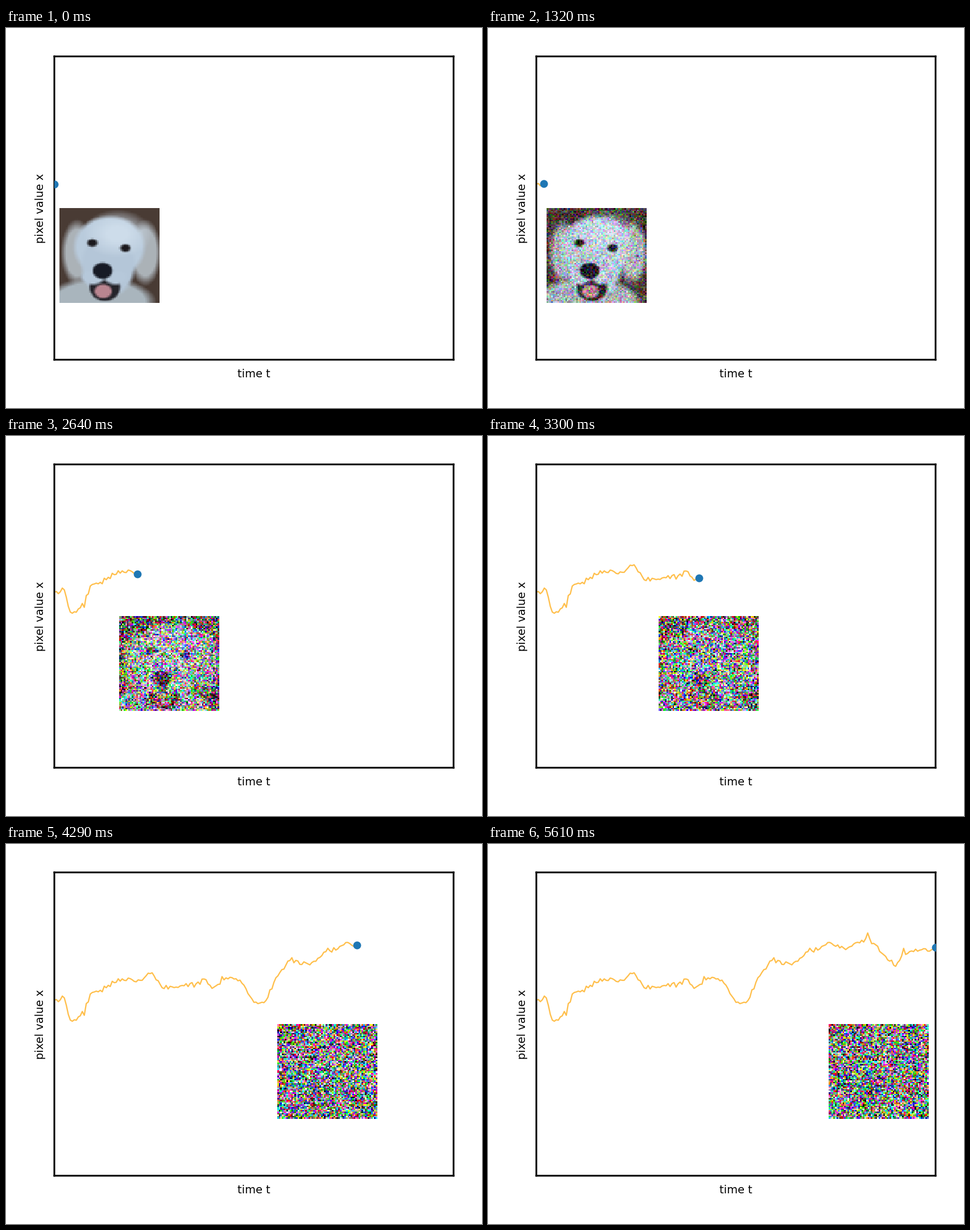
A matplotlib script for the animation above (5940 ms loop, 837 px wide and 669 px high).

```python
import numpy as np
import matplotlib.pyplot as plt
from matplotlib.animation import FuncAnimation
from matplotlib.colors import to_rgb

W, H, DPI = 837, 669, 128
PT = 72 / DPI                      # points per pixel
LEFT, RIGHT, TOP, BOTTOM = 85, 787, 50, 584
FRAMES, INTERVAL = 18, 330
STEPS = 200
CELLS = 64
IMG_X, IMG_Y, IMG_W, IMG_H, IMG_TRAVEL = 94, 316.6, 176, 167, 505
DIFFUSION = 5

rng = np.random.default_rng(4)


def random_walk():
    """Coarse course of the walk in pixels, roughened by seeded jitter."""
    course = [(0, 275), (5, 271), (8, 314), (15, 296), (18, 265), (25, 255),
              (34, 237), (44, 242), (48, 223), (54, 253), (72, 246), (75, 235),
              (79, 259), (84, 236), (94, 242), (100, 279), (106, 277),
              (111, 235), (118, 204), (129, 209), (134, 195), (147, 174),
              (155, 185), (166, 164), (180, 215), (184, 191), (200, 184)]
    jitter = rng.normal(0, 2.5, STEPS + 1)
    jitter[0] = 0
    return np.interp(np.arange(STEPS + 1), *zip(*course)) + jitter


def paint_dog():
    cells = (np.arange(CELLS) + 0.5) / CELLS
    x, y = np.meshgrid(IMG_X + cells * IMG_W, IMG_Y + cells * IMG_H)
    picture = np.ones((CELLS, CELLS, 3)) * to_rgb("#493b34")

    def blob(cx, cy, rx, ry, color, edge=4):
        r = np.hypot((x - cx) / rx, (y - cy) / ry)
        mask = np.clip((1 - r) * min(rx, ry) / edge + 0.5, 0, 1)[..., None]
        picture[:] += mask * (np.array(to_rgb(color)) - picture)

    blob(165, 482, 90, 40, "#a9b5bd", 9)            # chest
    for ear_x in (125, 245):
        blob(ear_x, 395, 24, 50, "#abb2b8", 9)
    blob(182, 385, 61, 53, "#b9cbdc", 8)            # head
    blob(180, 418, 46, 54, "#b4c6d8", 8)
    blob(196, 362, 40, 28, "#cddcea", 30)           # forehead
    blob(174, 455, 27, 25, "#25242b")               # mouth
    blob(171, 463, 15, 12, "#b98590")               # tongue
    for cheek_x in (153, 193):
        blob(cheek_x, 438, 20, 13, "#b6c8da", 5)
    for eye_x, eye_y in ((152, 378), (210, 387)):
        blob(eye_x, eye_y, 8.5, 6.5, "#1c1a1d")
    blob(170, 427, 17, 14, "#171b25")               # nose
    return picture


def progress(frame):
    x = frame / (FRAMES - 1)
    rest = 1 - x
    phase = x**2 * (1 + 0.61 * rest + 0.13 * rest**2)
    return np.sin(np.pi / 2 * phase) ** 2


def diffuse(picture):
    """One picture per frame: it fades into grey while noise takes over."""
    state, last, pictures = 2 * picture - 1, 0, []
    for frame in range(FRAMES):
        u = progress(frame)
        keep = np.exp(-DIFFUSION * (u - last))
        noise = rng.normal(size=state.shape)
        state = np.sqrt(keep) * state + np.sqrt(1 - keep) * noise
        pictures.append(np.clip((state + 1) / 2, 0, 1))
        last = u
    return pictures


walk_x = np.linspace(LEFT, RIGHT, STEPS + 1)
walk_y = random_walk()
pictures = diffuse(paint_dog())

plt.rcParams["font.family"] = "DejaVu Sans"
fig = plt.figure(figsize=(W / DPI, H / DPI), dpi=DPI, facecolor="white")
ax = fig.add_axes([LEFT / W, 1 - BOTTOM / H, (RIGHT - LEFT) / W, (BOTTOM - TOP) / H])
image = ax.imshow(pictures[0], aspect="auto", interpolation="nearest", zorder=1)
line, = ax.plot([], [], color="orange", alpha=0.7, lw=2.3 * PT, zorder=2)
dot, = ax.plot([], [], "o", color="#1f77b4", ms=13.8 * PT, mew=0, zorder=5)
ax.set(xlim=(LEFT, RIGHT), ylim=(BOTTOM, TOP), xticks=[], yticks=[])
for spine in ax.spines.values():
    spine.set(linewidth=3 * PT, snap=False)

label = dict(fontsize=19.44 * PT, ha="center", va="baseline", rotation_mode="anchor")
fig.text(436 / W, 1 - 615 / H, "time t", **label)
fig.text(66 / W, 1 - 317.5 / H, "pixel value x", rotation=90, **label)


def update(frame):
    u = progress(frame)
    k = round(STEPS * u - 0.4)
    x = IMG_X + IMG_TRAVEL * u
    image.set_data(pictures[frame])
    image.set_extent((x, x + IMG_W, IMG_Y + IMG_H, IMG_Y))
    line.set_data(walk_x[:k], walk_y[:k])
    dot.set_data([LEFT + (RIGHT - LEFT) * u], [walk_y[k]])
    return image, line, dot


anim = FuncAnimation(fig, update, frames=FRAMES, interval=INTERVAL,
                     repeat=True, repeat_delay=0)
plt.show()
```
